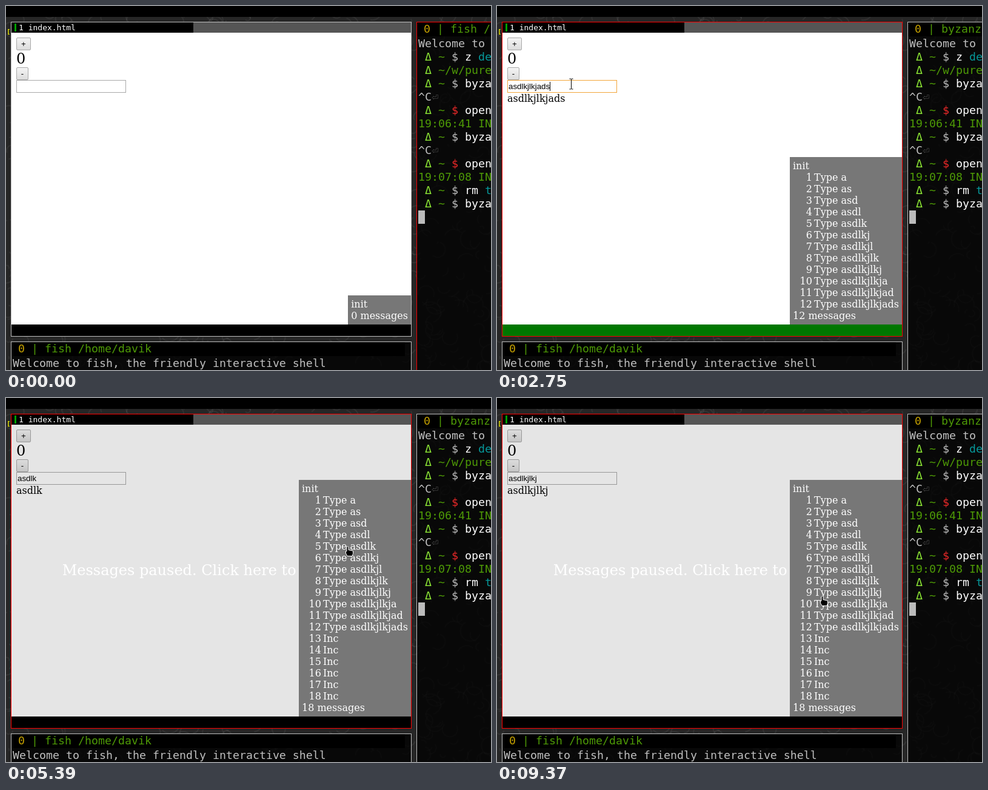
Recreate the animation shown at these times as an HTML page with a canvas. Size 800 px wide and 600 px high, loop 9.5 s.

```html
<!DOCTYPE html>
<html lang="en">
<head>
<meta charset="utf-8">
<title>Message debugger demo</title>
<style>
html, body { margin: 0; width: 100%; height: 100%; overflow: hidden; background: #262626; }
#stage { position: relative; width: 800px; height: 600px; overflow: hidden; }
#stage div, #stage canvas, #stage svg { position: absolute; box-sizing: border-box; white-space: pre; }

#bar { left: 0; top: 0; width: 800px; height: 18px; background: #000; color: #d0d0d0;
  font: bold 10px/17px "Noto Sans Mono", monospace; }
#bar b { color: #0f0; }
#bar .desk { color: #ff0; }
#bar .dim { color: #555; }

.win { border: 1px solid #c0c0c0; }
.term { background: rgba(0, 0, 0, .78); color: #c0c0c0; overflow: hidden;
  font: 18.27px/22px "DejaVu Sans Mono", monospace; }
.head { background: #000; height: 23px; color: #4e9a06; }
.y { color: #c4a000; } .g { color: #4e9a06; } .l { color: #8ae234; }
.r { color: #ef2929; } .c { color: #06989a; } .w { color: #fff; } .d { color: #4a4a4a; }

#browser { left: 8px; top: 26px; width: 661px; height: 519px; background: #fff; overflow: hidden; }
.chrome { color: #fff; font: 13px/17px "DejaVu Sans Mono", monospace; }
#status { left: 0; top: 498px; width: 659px; height: 19px; background: #000; line-height: 19px; }
.insert #status { background: #070; }
.lit { border-color: #f00; }

#page { left: 0; top: 17px; width: 659px; height: 481px; overflow: hidden; color: #000;
  font: 16px/19px "DejaVu Serif", serif; }
.btn { left: 8px; height: 21px; border: 1px solid #a8a8a8; border-radius: 2px; text-align: center;
  background: linear-gradient(#f4f4f4, #dcdcdc); font: 13.33px/19px "Liberation Sans", Arial, sans-serif; }
.btn.hover { border-color: #8a8a8a; }
.btn.down { background: linear-gradient(#d4d4d4, #ececec); }
#field { left: 8px; top: 78px; width: 181px; height: 21px; padding-left: 1px; border: 1px solid #a9a9a9;
  background: #fff; font: 13.33px/19px "Liberation Sans", Arial, sans-serif; }
.insert #field { border-color: #f2a53a; }
#caret { width: 1px; height: 15px; top: 2px; background: #000; }
#shade { inset: 0; background: rgba(0, 0, 0, .1); color: #fff; font-size: 24px; line-height: 481px; text-align: center; }
#panel { right: 0; bottom: 0; padding: 5px; background: #777; color: #fff; }
#panel span { display: inline-block; width: 32px; margin-right: 3px; text-align: right; }
#stage svg { left: 0; top: 0; overflow: visible; }
</style>
</head>
<body>
<div id="stage">
  <canvas id="wall" width="800" height="600"></canvas>
  <div id="bar">
    <div style="left:1px"><span class="desk">[1]</span> 2 3 : Spacing BSP : <b id="title"></b></div>
    <div style="right:133px">cpu <b id="cpu"></b> | mem <b>6</b> | swp 0 | bat <b>88</b><span class="dim">-</span> 4:34 | wlp1s0 0 0</div>
  </div>

  <div id="browser" class="win">
    <div class="chrome" style="left:0;top:0;width:659px;height:17px;background:#555">
      <div style="left:0;top:0;width:300px;height:17px;background:#000"></div>
      <div style="left:5px;top:2px;width:3px;height:13px;background:#00a000"></div>
      <div style="left:12px;top:0">1 index.html</div>
    </div>
    <div id="page">
      <div class="btn" id="plus" style="top:8px;width:24px">+</div>
      <div id="count" style="left:8px;top:29px;font-size:24px;line-height:28px"></div>
      <div class="btn" style="top:57px;width:20px">-</div>
      <div id="field"><span id="typed"></span><div id="caret"></div></div>
      <div id="echo" style="left:8px;top:99px"></div>
      <div id="shade">Messages paused. Click here to resume.</div>
      <div id="panel"></div>
    </div>
    <div id="status" class="chrome">
      <div id="mode" style="left:0">-- INSERT MODE --</div>
      <div id="url"></div>
      <div style="left:573px">[top]</div>
      <div style="left:618px">[1/1]</div>
    </div>
  </div>

  <div class="win term" style="left:8px;top:553px;width:661px;height:60px">
    <div class="head" style="left:0;top:0;width:649px"> <span class="y">0</span> | fish /home/davik</div>
    <div style="left:2px;top:24px">Welcome to fish, the friendly interactive shell</div>
  </div>
  <div id="side" class="win term" style="left:677px;top:26px;width:140px;height:590px">
    <div class="head" style="left:0;top:0;width:140px"> <span class="y">0</span> | <span id="job"></span></div>
    <div id="log" style="left:2px;top:24px"></div>
    <div style="left:2px;top:310px;width:11px;height:22px;background:#bbb"></div>
  </div>

  <svg id="mouse" width="1" height="1" stroke="#fff" stroke-linejoin="round">
    <path id="arrow" d="M0 0V14.5L3.4 11.4 5.8 17 8.2 16 5.8 10.5H10.4Z"/>
    <path id="beam" d="M-3 -8.5H-1L0 -8 1 -8.5H3M0 -8V8M-3 8.5H-1L0 8 1 8.5H3" fill="none" stroke="#000"/>
    <path id="hand" d="M-1.5 1Q0 -.8 1.5 1V6L9 7.5V12L7.5 16H-.5L-3 11.5V8H-1.5Z"/>
  </svg>
</div>
<script>
const $ = id => document.getElementById(id);
const LOOP = 9500, WORD = 'asdlkjlkjads';
const URL_TEXT = 'file:///home/davik/workspace/purescript-oak-debug/index.html';

const typing = [1600, 1640, 1680, 1710, 1740, 1790, 1830, 1870, 1920, 2230, 2270, 2330];
const clicks = Array.from({ length: 6 }, (_, i) => 3425 + 200 * i);
const cpu = [[0, 1], [1310, 12], [2310, 19], [3310, 9], [4310, 18], [5310, 12], [7310, 11], [8310, 10]];
// time and message number of each jump in the history
const jumps = [[5390, 5], [6150, 11], [6710, 15], [7800, 0], [9370, 9]];
// time, x, y of the pointer
const path = [
  [440, 790, 420], [660, 157, 201], [850, 157, 201], [970, 122, 145], [1130, 122, 145], [1290, 124, 128],
  [2710, 124, 128], [2750, 122, 128], [2970, 46, 37], [3150, 46, 37], [3300, 31, 65], [4740, 31, 65],
  [4940, 563, 244], [5540, 563, 244], [5900, 541, 362], [6330, 541, 362], [6470, 514, 424], [6680, 505, 435],
  [6860, 505, 435], [6940, 521, 330], [7020, 511, 216], [7170, 511, 216], [7650, 502, 156], [8080, 502, 156],
  [8800, 541, 509], [9010, 541, 509], [9110, 546, 420], [9210, 536, 326]
];

const past = (list, t) => list.filter(v => v <= t).length;
const latest = (keys, t) => keys.filter(k => k[0] <= t).pop();

function pointer(t) {
  const i = path.findIndex(k => k[0] > t);
  if (i < 0) return path[path.length - 1].slice(1);
  const [t0, x0, y0] = path[i - 1], [t1, x1, y1] = path[i];
  const u = (t - t0) / (t1 - t0), e = u * u * (3 - 2 * u);
  return [x0 + (x1 - x0) * e, y0 + (y1 - y0) * e].map(Math.round);
}

function set(id, html) {
  const el = $(id);
  if (el.shown !== html) el.innerHTML = el.shown = html;
}
const show = (id, on) => { $(id).style.display = on ? '' : 'none'; };

function panelText(n) {
  const rows = ['init'];
  for (let i = 1; i <= n; i++)
    rows.push(`<span>${i}</span>` + (i > WORD.length ? 'Inc' : 'Type ' + WORD.slice(0, i)));
  return [...rows, n + ' messages'].join('\n');
}

function draw() {
  const t = performance.now() % LOOP;
  const focused = t >= 480, insert = t >= 1390 && t < 3325;
  const sent = past(typing, t) + past(clicks, t);
  const jump = latest(jumps, t);
  const step = jump ? jump[1] : sent;
  const text = WORD.slice(0, step);

  $('browser').classList.toggle('lit', focused);
  $('browser').classList.toggle('insert', insert);
  $('side').classList.toggle('lit', !focused);
  set('title', focused ? 'index.html - qutebrowser' : 'byzanz-record /home/davik');
  set('job', focused ? 'byzanz-record' : 'fish /home');
  set('cpu', String(latest(cpu, t)[1]));
  show('mode', insert);
  set('url', insert ? URL_TEXT.slice(0, 52) + '…' : URL_TEXT);
  $('url').style.left = insert ? '150.5px' : '99.5px';

  set('count', String(Math.max(0, step - WORD.length)));
  set('typed', text);
  set('echo', text);
  set('panel', panelText(sent));
  show('shade', jump);
  show('caret', insert && (t < 2330 || (t - 2330) % 1000 < 500));
  $('caret').style.left = 1 + Math.round($('typed').offsetWidth) + 'px';
  $('plus').classList.toggle('hover', t > 3260 && t < 4760);
  $('plus').classList.toggle('down', clicks.some(c => t >= c - 100 && t < c));

  show('mouse', t >= 440);
  if (t >= 440) {
    const [x, y] = pointer(t);
    const beam = x > 17 && x < 198 && y > 122 && y < 143 && t < 3000;
    const hand = t > 4740 && x > 483 && y > 135;
    $('mouse').style.transform = `translate(${x + .5}px,${y + .5}px)`;
    show('beam', beam);
    show('hand', hand);
    show('arrow', !beam && !hand);
  }
  requestAnimationFrame(draw);
}

function wallpaper() {
  const g = $('wall').getContext('2d');
  let seed = 7;
  const rnd = n => (seed = seed * 16807 % 2147483647) / 2147483647 * n;
  g.fillStyle = '#262626';
  g.fillRect(0, 0, 800, 600);
  g.lineWidth = 2;
  g.strokeStyle = 'rgba(255,255,255,.06)';
  for (let i = 0; i < 900; i++) {
    const a = rnd(7);
    g.beginPath();
    g.arc(rnd(800), rnd(600), 3 + rnd(14), a, a + 1 + rnd(3));
    g.stroke();
  }
}

const span = (c, s) => `<span class="${c}">${s}</span>`;
const prompt = (cmd, c = '') => ` ${span('l', 'Δ')} ${span('g', '~')} ${span(c, '$')} ${span('w', cmd)}`;
const stop = '^C' + span('d', '⏎');
$('log').innerHTML = [
  'Welcome to fish',
  prompt('z ') + span('c', 'debug'),
  ` ${span('l', 'Δ')} ${span('g', '~/w/purescript')}`,
  prompt('byzanz'), stop, prompt('open', 'r'), span('g', '19:06:41 INFO'),
  prompt('byzanz'), stop, prompt('open', 'r'), span('g', '19:07:08 INFO'),
  prompt('rm ') + span('c', 'test'),
  prompt('byzanz')
].join('\n');

wallpaper();
draw();
</script>
</body>
</html>
```
